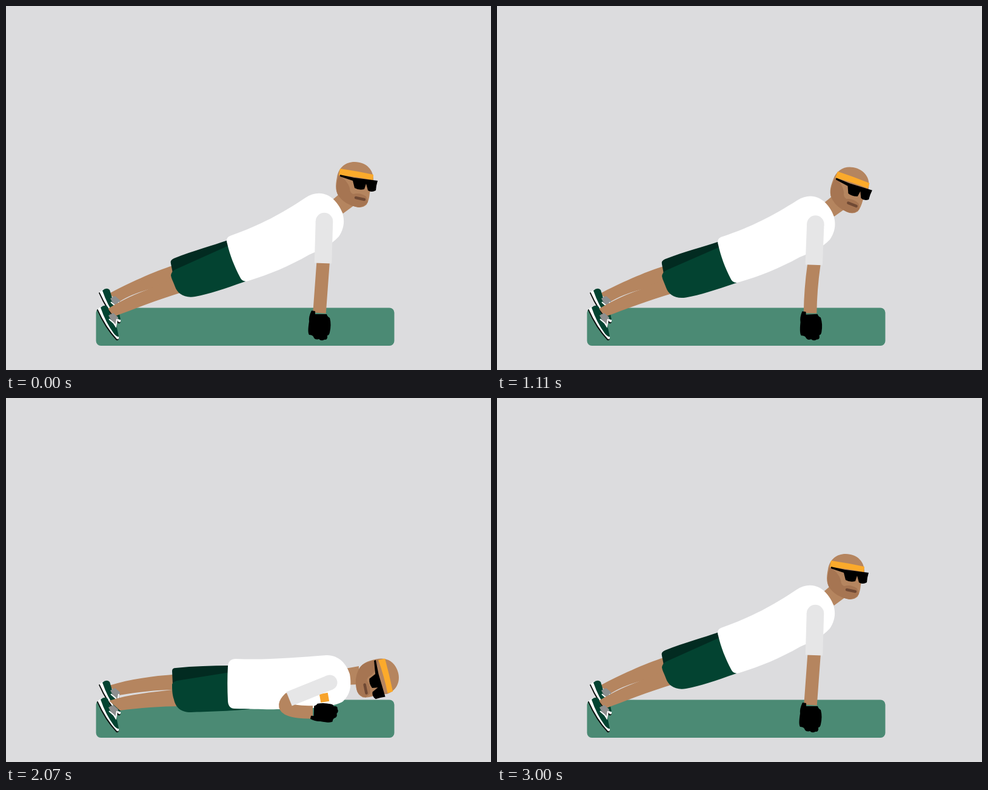
These frames come from a looping animation (800x600 px, 3030 ms). An HTML page with a canvas:

```html
<!DOCTYPE html>
<html>
<head>
<meta charset="utf-8">
<style>
html, body { margin: 0; height: 100%; overflow: hidden; background: #dcdcde; }
canvas { display: block; }
</style>
</head>
<body>
<canvas id="stage" width="800" height="600"></canvas>
<script>
const ctx = document.getElementById('stage').getContext('2d');
const LOOP = 3030, CYCLE = 600, STEP = 30;
const SKIN = '#b5855f', GREEN = '#034331', WHITE = '#fff';

// Body outlines: [plank, lowered], same commands so they can be blended
const shapes = {
  backLeg: [
    'M170 474 C200 458 245 437 275 428 L290 450 L232 468 C215 473 200 479 186 488 Z',
    'M170 474 C205 463 245 458 275 456 L290 478 L274 481 C250 481 215 485 186 490 Z'],
  frontLeg: [
    'M168 499 C195 483 215 474 232 468 L285 445 L290 472 C250 484 210 500 178 512 Z',
    'M170 499 C205 488 240 485 274 481 L290 480 L290 508 C255 508 220 511 188 515 Z'],
  backShorts: [
    'M272 425 Q270 419 277 416 C310 403 340 395 366 386 L380 420 L275 440 Z',
    'M274 450 Q274 445 280 445 C310 442 340 441 368 441 L380 470 L275 473 Z'],
  frontShorts: [
    'M272 444 Q273 437 280 434 L367 395 L395 454 C360 466 335 475 312 479 C294 482 283 474 279 463 C275 452 273 450 272 444 Z',
    'M274 472 Q275 468 282 466 L370 452 L402 513 C370 516 330 517 305 518 C288 518 280 510 277 497 C274 488 274 480 274 472 Z'],
  neck: [
    'M538 320 L552 308 L575 328 L556 342 Z',
    'M560 446 L582 442 L582 472 L560 473 Z'],
  shirt: [
    'M365 392 Q361 381 372 378 C420 361 455 342 494 316 C512 304 532 307 545 324 C560 342 561 363 549 380 C535 395 520 401 500 410 C465 430 435 442 400 453 Q390 456 386 447 C377 430 369 410 365 392 Z',
    'M366 442 Q367 430 379 430 C430 432 475 428 528 424 C548 423 562 438 567 455 C571 478 566 490 556 500 C545 508 510 512 480 512 C440 514 420 513 377 512 Q367 512 366 500 C365 480 365 460 366 442 Z']
};

const lerp = (a, b, k) => a + (b - a) * k;
const point = (a, b, k) => [lerp(a[0], b[0], k), lerp(a[1], b[1], k)];
const easeInOut = (u, p) => u < .5 ? 2 ** (p - 1) * u ** p : 1 - 2 ** (p - 1) * (1 - u) ** p;

function blend([a, b], k) {
  const ends = b.match(/\d+/g);
  let i = 0;
  return a.replace(/\d+/g, n => lerp(+n, +ends[i++], k).toFixed(2));
}

function fill(path, color) {
  ctx.fillStyle = color;
  ctx.fill(new Path2D(path));
}

function stroke(path, color, width, cap = 'butt') {
  ctx.strokeStyle = color;
  ctx.lineWidth = width;
  ctx.lineCap = cap;
  ctx.stroke(new Path2D(path));
}

function at(x, y, angle, draw) {
  ctx.save();
  ctx.translate(x, y);
  ctx.rotate(angle * Math.PI / 180);
  draw();
  ctx.restore();
}

function shoe() {
  fill('M150 501 L153 498 L186 549 Q185 552 182 551 Q163 531 150 501 Z', '#0b0f0e');
  fill('M151 499 L158 495 L186 545 Q187 550 183 549 Q165 530 151 499 Z', WHITE);
  fill('M156 497 Q163 491 168 496 L172 509 L182 526 L186 545 Q183 546 178 540 Q164 521 156 497 Z', GREEN);
  fill('M169 510 L177 506 L185 513 L182 530 L175 521 Z', '#8d8f8f');
  stroke('M170 516 L178 523 L181 528 L183 516', WHITE, 2);
}

function head() {
  fill('M575 257 C595 257 607 271 606 288 L600 308 Q599 320 595 327 Q588 334 577 331 Q560 327 551 316 C543 307 543 297 546 282 C549 266 560 257 575 257 Z', SKIN);
  fill('M549 279 Q563 287 567 300 Q567 308 573 310 Q584 307 594 314 L597 323 Q589 334 577 331 Q560 327 551 316 Q540 305 549 279 Z', '#a67552');
  stroke('M577 316 L591 319', '#6f4934', 4.5, 'round');
  fill('M551 268 Q578 272 606 278 L605 287 Q577 281 549 279 Z', '#fbaa2b');
}

const glasses = 'M551 278 L574 283 L613 288 L611 296 L610 304 Q603 308 597 304 L594 293 L591 302 Q582 304 575 300 L572 288 L551 281 Z';
const glove = 'M504 502 L510 503 L510 508 L529 508 Q530 512 534 514 Q537 525 534 538 Q533 543 530 543 Q531 551 525 550 Q520 553 516 549 Q509 551 507 545 Q505 542 500 542 Q497 538 500 520 Q499 512 504 502 Z';

function arm(k) {
  const shoulder = point([525, 355], [534, 469], k);
  const cuff = [lerp(523, 467, k * k * (3 - 2 * k)), lerp(424, 496, k)];
  const wrist = point([517, 506], [506, 518], k);
  const elbow = point([520, 465], [444, 518], k);
  stroke(`M${point(cuff, shoulder, .06)} L${cuff} Q${elbow} ${wrist}`, SKIN, 21.5);
  at(...wrist, -88 * k, () => {
    ctx.scale(1 - .15 * k, 1 - .08 * k);
    ctx.translate(-517, -506);
    fill(glove, '#000');
  });
  const width = lerp(28.5, 25, k);
  stroke(`M${shoulder} L${cuff}`, '#e6e6e7', width);
  ctx.beginPath();
  ctx.arc(...shoulder, width / 2, 0, 7);
  ctx.fillStyle = '#e6e6e7';
  ctx.fill();
}

function draw(time) {
  const phase = Math.floor(time % LOOP / STEP) * STEP % CYCLE;
  const u = 1 - Math.abs(phase / (CYCLE / 2) - 1);
  const k = easeInOut(u, 5), nod = easeInOut(u, 2.4);
  const body = (name, color) => fill(blend(shapes[name], k), color);

  ctx.fillStyle = '#dcdcde';
  ctx.fillRect(0, 0, 800, 600);
  ctx.fillStyle = '#4b8a74';
  ctx.beginPath();
  ctx.roundRect(148.5, 497.5, 492, 62.5, 8);
  ctx.fill();

  body('backLeg', SKIN);
  at(3, -28, 0, shoe);
  body('frontLeg', SKIN);
  shoe();
  body('backShorts', '#022b21');
  body('frontShorts', GREEN);
  body('neck', SKIN);

  // The head tips about the base of the neck
  at(lerp(558, 573, k), lerp(328, 460, k), 67 * nod, () => {
    ctx.translate(-558, -328);
    head();
    ctx.translate(-4 * nod, 5 * nod);
    fill(glasses, '#000');
  });

  body('shirt', WHITE);
  at(525, lerp(390, 494, k), lerp(-34, -10, k), () => fill('M-7 -7 H7 V7 H-7 Z', '#f7a32b'));
  arm(k);
}

const start = performance.now();
function tick() {
  draw(performance.now() - start);
  requestAnimationFrame(tick);
}
tick();
</script>
</body>
</html>
```
